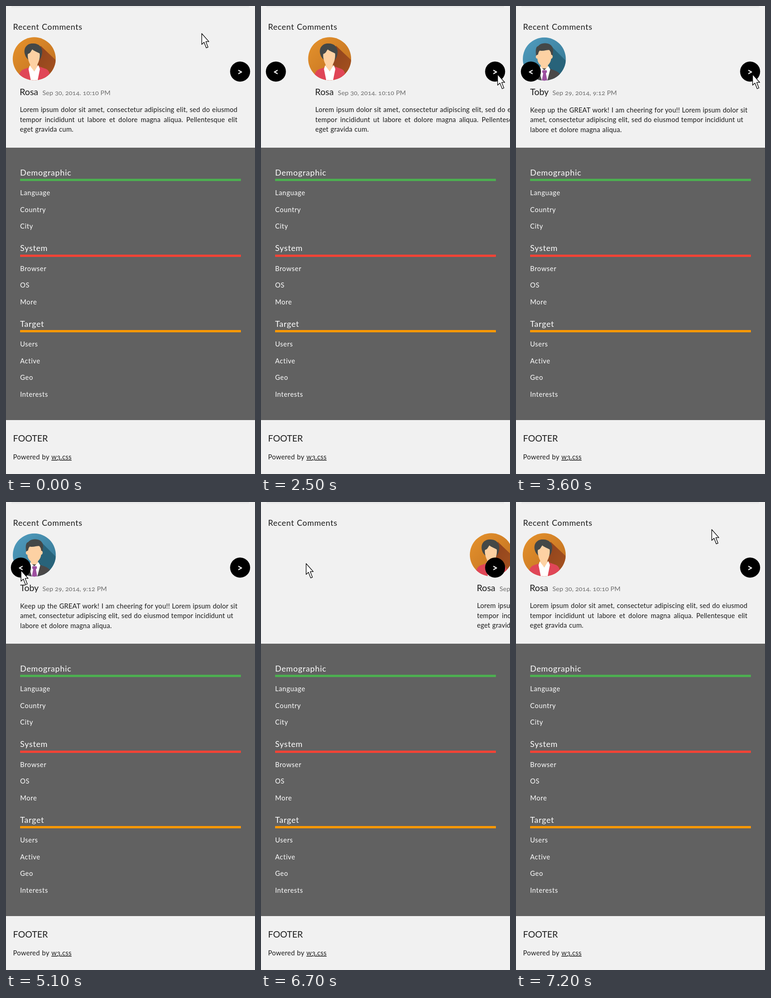
Recreate the animation shown at these times as an HTML page. Size 547 by 1024 pixels, loop 8200 ms.

```html
<!DOCTYPE html>
<html lang="en">
<head>
<meta charset="utf-8">
<title>Recent Comments</title>
<style>
  html, body { margin: 0; width: 100%; height: 100%; overflow: hidden; background: #f1f1f1; }
  svg { display: block; width: 100%; height: 100%; }
  text, .copy {
    font: 14.7px Lato, "Open Sans", sans-serif;
    letter-spacing: .02em;
    word-spacing: .04em;
    font-variant-numeric: oldstyle-nums;
    color: #1a1a1a;
    fill: #1a1a1a;
  }
  .head { font-size: 17.8px; letter-spacing: .033em; }
  .big { font-size: 19.5px; letter-spacing: 0; }
  .date { font-size: 14.3px; letter-spacing: .008em; word-spacing: 0; fill: #6c6c6c; }
  .link { text-decoration: underline; }
  .light { fill: #fff; letter-spacing: .042em; }
  .sign { font-size: 22px; font-weight: 700; letter-spacing: 0; fill: #fff; text-anchor: middle; }
  .copy { width: 478px; line-height: 21.5px; letter-spacing: .013em; white-space: nowrap; }
  .full { text-align: justify; text-align-last: justify; }
</style>
</head>
<body>
<svg viewBox="0 0 547 1024" preserveAspectRatio="none">
  <defs>
    <linearGradient id="shade" x2="0" y2="1">
      <stop stop-color="#e4e4e4"/><stop offset="1" stop-color="#f1f1f1"/>
    </linearGradient>
    <linearGradient id="amber" x2="1" y2="1">
      <stop stop-color="#e6932c"/><stop offset="1" stop-color="#bd6d20"/>
    </linearGradient>
    <linearGradient id="rust" x2="1" y2="1">
      <stop stop-color="#8c401d"/><stop offset="1" stop-color="#a9551f"/>
    </linearGradient>
    <linearGradient id="blue" x2="1" y2="1">
      <stop stop-color="#519dc0"/><stop offset="1" stop-color="#33748f"/>
    </linearGradient>
    <clipPath id="disc"><circle cx="62" cy="115.5" r="47.2"/></clipPath>
  </defs>

  <rect width="547" height="1024" fill="#f1f1f1"/>
  <rect x="12" width="522" height="5" fill="url(#shade)"/>
  <text class="head" x="15.5" y="52">Recent Comments</text>

  <g id="first">
    <g clip-path="url(#disc)">
      <rect x="14" y="68" width="96" height="96" fill="url(#amber)"/>
      <path d="M76 87L112 121V166H82L60 140Z" fill="url(#rust)"/>
      <path d="M41 104C38 88 50 81 60 82C72 82 80 90 79.5 101C79 110 76 116 72 119H51C44 114 42 108 41 104Z" fill="#444847"/>
      <path d="M48 105C55 103 55 97 58 95C62 99 70 101 74 104C75 116 71 124 69 128V133L62 143L53 135V128C49 120 47 111 48 105Z" fill="#fdd1a3"/>
      <path d="M26 165C28 146 33 140 40 138L52 134L62 156L72 132L86 137C92 139 94 142 96 148L99 165Z" fill="#e04657"/>
      <path d="M52 130L49.5 138L55 165H69L74.5 138L71 129L62 143Z" fill="#fff"/>
    </g>
    <text class="big" x="30" y="194.5">Rosa</text>
    <text class="date" x="80" y="194.5">Sep 30, 2014. 10:10 PM</text>
    <foreignObject x="30.5" y="216.3" width="500" height="70">
      <div class="copy">
        <div class="full">Lorem ipsum dolor sit amet, consectetur adipiscing elit, sed do eiusmod</div>
        <div class="full">tempor incididunt ut labore et dolore magna aliqua. Pellentesque elit</div>
        <div>eget gravida cum.</div>
      </div>
    </foreignObject>
  </g>

  <g id="second">
    <g clip-path="url(#disc)" transform="translate(.2 .5)">
      <rect x="14" y="68" width="96" height="96" fill="url(#blue)"/>
      <path d="M78 88L112 122V166H84L60 140Z" fill="#28637a"/>
      <path d="M44 108C42 92 45 88 49 87C54 79 73 79 78 87C82 91 82 98 80 108Z" fill="#444847"/>
      <path d="M48 106C49 103 49 100 52 97C60 99 69 95 73 96C76 99 77 103 77 106C82 106 81 115 77 115C76 122 73 126 70 129V137L62 145L54 137V129C50 126 47 121 47 115C42 115 42 106 48 106Z" fill="#fdd1a3"/>
      <path d="M22 165C25 146 30 143 52 136H72C94 143 99 146 102 165Z" fill="#4a4848"/>
      <path d="M53 132L50 138L57 165H68L75 138L71 131L62 140Z" fill="#fff"/>
      <path d="M58 140H67L68 144L65.5 147L69 165H56L59.5 147L57 144Z" fill="#9c4f9f"/>
    </g>
    <text class="big" x="31" y="194.5">Toby</text>
    <text class="date" x="80" y="194.5">Sep 29, 2014, 9:12 PM</text>
    <foreignObject x="31" y="216.8" width="500" height="70">
      <div class="copy">
        <div>Keep up the GREAT work! I am cheering for you!! Lorem ipsum dolor sit</div>
        <div>amet, consectetur adipiscing elit, sed do eiusmod tempor incididunt ut</div>
        <div>labore et dolore magna aliqua.</div>
      </div>
    </foreignObject>
  </g>

  <g id="back">
    <circle cx="32.7" cy="143.5" r="22"/>
    <text class="sign" x="32.7" y="150.5">&lt;</text>
  </g>
  <g>
    <circle cx="514.3" cy="143.5" r="22"/>
    <text class="sign" x="514.3" y="150.5">&gt;</text>
  </g>

  <rect y="310" width="547" height="596" fill="#616161"/>
  <g id="menu"></g>

  <text class="big" x="15.5" y="952.5">FOOTER</text>
  <text x="15.5" y="992">Powered by</text>
  <text class="link" x="99.7" y="992">w3.css</text>

  <path id="pointer" d="M.5 .8V24.5L5.6 19.8L10.5 32.2L14.3 30.7L9.5 18.4H16.2Z"
        fill="#fff" stroke="#000" stroke-width="1.3" stroke-linejoin="round"/>
</svg>
<script>
  const LOOP = 8200, TICK = 100, STRIDE = 88.8;
  const $ = id => document.getElementById(id);
  const svgNS = "http://www.w3.org/2000/svg";

  function add(tag, attrs, label = "") {
    const node = document.createElementNS(svgNS, tag);
    for (const name in attrs) node.setAttribute(name, attrs[name]);
    node.textContent = label;
    $("menu").append(node);
  }

  [
    ["Demographic", "#4caf50", ["Language", "Country", "City"]],
    ["System", "#f44336", ["Browser", "OS", "More"]],
    ["Target", "#ff9800", ["Users", "Active", "Geo", "Interests"]]
  ].forEach(([title, color, items], i) => {
    const y = 370.5 + 165.6 * i;
    add("text", { x: 31, y, class: "head light" }, title);
    add("rect", { x: 31, y: Math.round(y + 7.4), width: 485, height: 5, fill: color });
    items.forEach((item, n) =>
      add("text", { x: 31, y: y + 43.5 + 36.5 * n, class: "light" }, item));
  });

  // Ticks completed since start, the first one landing at start itself.
  const ticks = (t, start, count) =>
    Math.max(0, Math.min(count, Math.floor((t - start) / TICK) + 1));

  const rest = [429.5, 59.5], onNext = [519.3, 148.8], onBack = [32.5, 148.8];
  const moves = [
    [1000, rest, onNext],
    [4600, onNext, onBack],
    [6700, onBack, rest]
  ];

  function pointerAt(t) {
    const [start, from, to] = moves.filter(m => t >= m[0]).pop() || moves[0];
    const p = ticks(t, start, 6) / 6;
    return from.map((v, i) => v + (to[i] - v) * p);
  }

  function place(id, x, y = 0) {
    $(id).setAttribute("transform", `translate(${x} ${y})`);
  }

  function show(id, visible) {
    $(id).setAttribute("visibility", visible ? "visible" : "hidden");
  }

  // One slide leaves in six ticks, then the other enters in six.
  function draw(t) {
    const step = ticks(t, 2500, 12) - ticks(t, 6100, 12);
    place("first", STRIDE * step);
    place("second", STRIDE * (step - 12));
    show("first", step < 6);
    show("second", step > 6);
    show("back", t >= 2500 && t < 6100);
    place("pointer", ...pointerAt(t));
  }

  const begin = performance.now();
  function frame() {
    draw((performance.now() - begin) % LOOP);
    requestAnimationFrame(frame);
  }
  frame();
</script>
</body>
</html>
```
